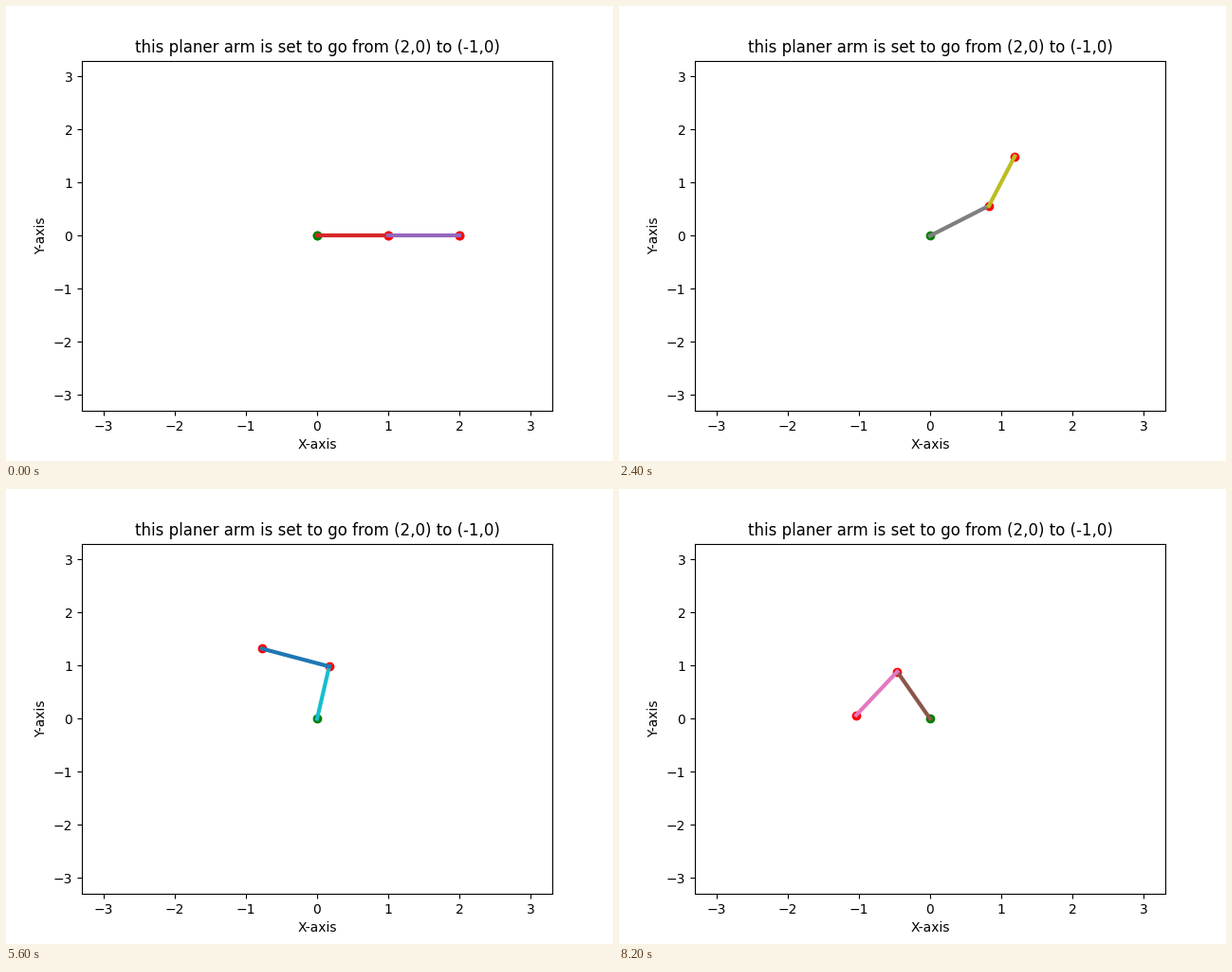
Animation of 640 by 480 pixels, one loop 8.4 s. Source, as a matplotlib script:

```python
import numpy as np
import matplotlib.pyplot as plt
from matplotlib.animation import FuncAnimation

STEP = 0.05                                # joint angle per frame, radians
GOAL = 2 * np.pi / 3                       # both joint angles at (-1, 0)
ANGLES = np.arange(0, GOAL, STEP)
LIMIT = 3.3

fig, ax = plt.subplots(figsize=(6.4, 4.8), dpi=100)
ax.set(xlim=(-LIMIT, LIMIT), ylim=(-LIMIT, LIMIT),
       xlabel="X-axis", ylabel="Y-axis",
       title="this planer arm is set to go from (2,0) to (-1,0)")

# The start pose is painted twice, which hardens the marker edges.
layers = [(ax.scatter(0, 0, color="g"), ax.scatter([1, 2], [0, 0], color="r"))
          for _ in range(2)]
links = [ax.plot([], [], lw=3)[0] for _ in range(2)]


def arm(theta):
    """Base, elbow and hand for equal angles at both joints."""
    elbow = np.array([np.cos(theta), np.sin(theta)])
    hand = elbow + [np.cos(2 * theta), np.sin(2 * theta)]
    return np.array([[0, 0], elbow, hand])


def update(i):
    points = arm(ANGLES[i])
    for base, joints in layers:
        joints.set_offsets(points[1:])
    for dots in layers[1]:
        dots.set_visible(i == 0)
    for k, link in enumerate(links):
        link.set_data(*points[k:k + 2].T)
        link.set_color(f"C{(3 + 2 * i + k) % 10}")
    return links


anim = FuncAnimation(fig, update, frames=len(ANGLES), interval=200,
                     init_func=lambda: update(0), repeat=True, repeat_delay=0)
plt.show()
```
